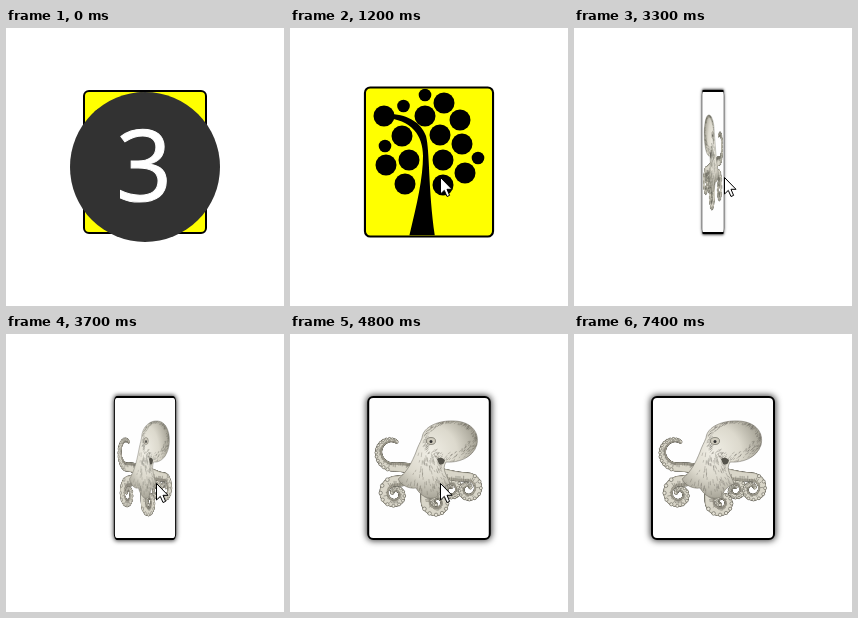
Animation of 278 by 278 pixels, one loop 7.5 s. Source, as an HTML page:

```html
<!DOCTYPE html>
<html lang="en">
<head>
<meta charset="utf-8">
<title>Card flip</title>
<style>
  html, body { margin: 0; width: 100%; height: 100%; overflow: hidden; background: #fff; }
  #card {
    position: absolute; left: 77px; top: 62px; width: 124px; height: 144px;
    box-sizing: border-box; border: 2px solid #000; border-radius: 6px;
    background: #ff0; overflow: hidden;
  }
  #card.back { background: #fefefe; box-shadow: 0 0 6px 1px #444; }
  #card svg { position: absolute; inset: 0; width: 100%; height: 100%; }
  #card.back #tree, #card:not(.back) #octopus { display: none; }
  #top { position: absolute; left: 0; top: 0; width: 278px; height: 278px; }
  #count text {
    font: 98px "Open Sans", "Noto Sans", sans-serif;
    fill: #fff; stroke: #fff; text-anchor: middle;
  }
</style>
</head>
<body>
<div id="card">
  <svg id="tree" viewBox="76 60.5 126 147" preserveAspectRatio="none">
    <path d="M94 86C114 85 130 92 136 108C140 124 138 160 145 209H119C127 176 133 150 133 128C133 108 122 91 94 90Z"/>
  </svg>
  <svg id="octopus" viewBox="79 64 120 140" preserveAspectRatio="none">
    <defs>
      <radialGradient id="skin" cx=".4" cy=".4" r=".62">
        <stop offset="0" stop-color="#f0eee5"/>
        <stop offset=".55" stop-color="#dcd9cd"/>
        <stop offset="1" stop-color="#a3a093"/>
      </radialGradient>
      <clipPath id="inside"><use href="#body"/></clipPath>
    </defs>
    <g id="arms"></g>
    <path id="body" d="M132 104C133 92 150 86 165 87C182 88 190 99 187 111C183 124 168 129 156 128C151 136 158 142 160 150C154 152 150 156 147 163C138 167 130 161 126 154C118 155 111 151 108 145C117 138 122 128 126 118C128 112 130 109 132 104Z" fill="url(#skin)" stroke="#77756b" stroke-width=".6"/>
    <path id="hatch" clip-path="url(#inside)" fill="none" stroke="#5f5d54" stroke-width=".5" opacity=".6"/>
    <ellipse cx="141" cy="107" rx="4.500" ry="3.500" fill="#cfcbbd" stroke="#68665c" stroke-width=".7"/>
    <circle cx="141" cy="107.500" r="1.500" fill="#333"/>
    <path d="M147 125Q151 122 155 126Q154 132 149 130Z" fill="#55534b"/>
  </svg>
</div>
<svg id="top" viewBox="0 0 278 278">
  <g id="count"><circle cx="139" cy="139" r="75" fill="#323232"/><text x="138" y="173">3</text></g>
  <circle id="press" cx="151" cy="149" r="25" fill="rgba(215,180,60,.75)"/>
  <path id="cursor" d="M.5.5V17L4.300 13.400L7 19.500L9.600 18.400L7 12.300H12Z" fill="#fff" stroke="#000"/>
</svg>
<script>
const $ = id => document.getElementById(id);
const LOOP = 7500, STEP = 100, CLICK = 2800;

function add(parent, tag, attrs) {
  const el = document.createElementNS('http://www.w3.org/2000/svg', tag);
  for (const k in attrs) el.setAttribute(k, attrs[k]);
  return parent.appendChild(el);
}

let seed = 7;
const rand = () => (seed = (seed * 16807) % 2147483647) / 2147483647;
const clamp = v => Math.min(1, Math.max(0, v));
const mix = (a, b, k) => a + (b - a) * k;

// Tree crown: big and small leaves
const leaves = (r, list) => list.forEach(([cx, cy]) => add($('tree'), 'circle', { cx, cy, r }));
leaves(10.5, [[94, 88], [154, 75], [135, 88], [170, 92], [112, 108], [150, 107], [172, 116],
  [96, 137], [119, 132], [153, 132], [175, 145], [115, 156], [153, 157]]);
leaves(6.3, [[113.5, 78], [135, 67], [188, 130], [95, 118]]);

// Octopus arm: a curve from the body that runs into a shrinking spiral
function arm({ from, center, radius, angle, sweep, width }) {
  const rad = Math.PI / 180, lead = .25, count = 120;
  const spiral = v => {
    const a = (angle + sweep * v) * rad, r = radius * (1 - Math.abs(sweep) / 560 * v);
    return { a, x: center[0] + r * Math.cos(a), y: center[1] + r * Math.sin(a) };
  };
  const entry = spiral(0), pull = radius * Math.sign(sweep);
  const bend = { x: entry.x + pull * Math.sin(entry.a), y: entry.y - pull * Math.cos(entry.a) };
  const curve = (k, axis, i) =>
    mix(mix(from[i], bend[axis], k), mix(bend[axis], entry[axis], k), k);
  const points = Array.from({ length: count }, (_, i) => {
    const u = i / count, k = u / lead;
    const p = u < lead ? { a: entry.a, x: curve(k, 'x', 0), y: curve(k, 'y', 1) }
      : spiral((u - lead) / (1 - lead));
    return { ...p, w: width * (1 - .75 * u) };
  });
  const dot = (p, shift, r, fill, extra) => add($('arms'), 'circle', {
    cx: p.x + shift * p.w * Math.cos(p.a), cy: p.y + shift * p.w * Math.sin(p.a), r, fill, ...extra });

  points.forEach(p => dot(p, 0, p.w + .5, '#6b695f'));
  points.forEach(p => dot(p, 0, p.w, '#b3afa1'));
  points.forEach(p => dot(p, .2, p.w * .65, '#d9d6c9'));
  points.filter((p, i) => i % 2).forEach(p => {
    const c = Math.cos(p.a), s = Math.sin(p.a), inner = p.w * (.3 - rand());
    add($('arms'), 'path', { stroke: '#5f5d54', 'stroke-width': .5,
      d: `M${p.x - p.w * c} ${p.y - p.w * s}L${p.x + inner * c} ${p.y + inner * s}` });
  });
  points.filter((p, i) => i > count * lead && i % 6 === 0).forEach(p =>
    dot(p, .85, .6 + p.w * .27, '#e6e3d7', { stroke: '#605e55', 'stroke-width': .6 }));
}
arm({ from: [122, 136], center: [102, 117], radius: 16, angle: 90, sweep: 210, width: 5 });
arm({ from: [146, 140], center: [161, 156], radius: 9, angle: 270, sweep: 380, width: 4 });
arm({ from: [146, 138], center: [178, 155], radius: 12, angle: 270, sweep: 430, width: 5 });
arm({ from: [124, 142], center: [105, 160], radius: 13, angle: 270, sweep: -430, width: 6 });
arm({ from: [138, 148], center: [147, 168], radius: 11, angle: 180, sweep: -430, width: 6 });

// Engraved shading: around the head's rim and down the body
let hatch = '';
for (let i = 0; i < 220; i++) {
  const a = rand() * Math.PI * 2, r = Math.sqrt(mix(a < 2.5 ? .3 : .7, 1, rand()));
  hatch += `M${160 + 28 * r * Math.cos(a)} ${108 + 21 * r * Math.sin(a)}l${1 + 2 * rand()} ${-1 - 2 * rand()}`;
}
for (let i = 0; i < 110; i++) {
  const k = rand(), side = 2 * Math.sqrt(rand()) - 1;
  hatch += `M${mix(135, 133, k) + mix(12, 27, k) * side} ${mix(118, 160, k)}l${2 * side} ${2 + 3 * rand()}`;
}
$('hatch').setAttribute('d', hatch);

// Decaying turn in degrees left, from mirrored to facing
function turnLeft(t) {
  const end = Math.exp(-2.2), s = Math.max(0, t - CLICK) / 1000;
  return 180 * Math.max(0, Math.exp(-s) - end) / (1 - end);
}

// Pointer drifts in, glides onto the card, later speeds away
function pointer(t) {
  const drift = clamp((t - 100) / 200), glide = clamp((t - 600) / 600);
  const leave = clamp((t - 5600) / 300) ** 2, ease = glide * glide * (3 - 2 * glide);
  return [mix(mix(mix(236, 222, drift), 150, ease), 19, leave),
    mix(mix(mix(174, 168, drift), 149, ease), 236, leave)];
}

const show = (id, on) => { $(id).style.display = on ? '' : 'none'; };

function render(t) {
  const back = t > CLICK;
  $('card').className = back ? 'back' : '';
  $('card').style.transform = back
    ? `scaleX(${Math.cos(turnLeft(t) * Math.PI / 180)})`
    : `scale(${1 + .05 * clamp((t - 700) / 400)})`;
  show('count', t < 100);
  show('press', t === CLICK);
  show('cursor', t >= 100 && t < 6000);
  $('cursor').setAttribute('transform', `translate(${pointer(t)})`);
}

const start = performance.now();
function tick() {
  const t = (performance.now() - start) % LOOP;
  render(Math.floor(t / STEP) * STEP);
  requestAnimationFrame(tick);
}
tick();
</script>
</body>
</html>
```
